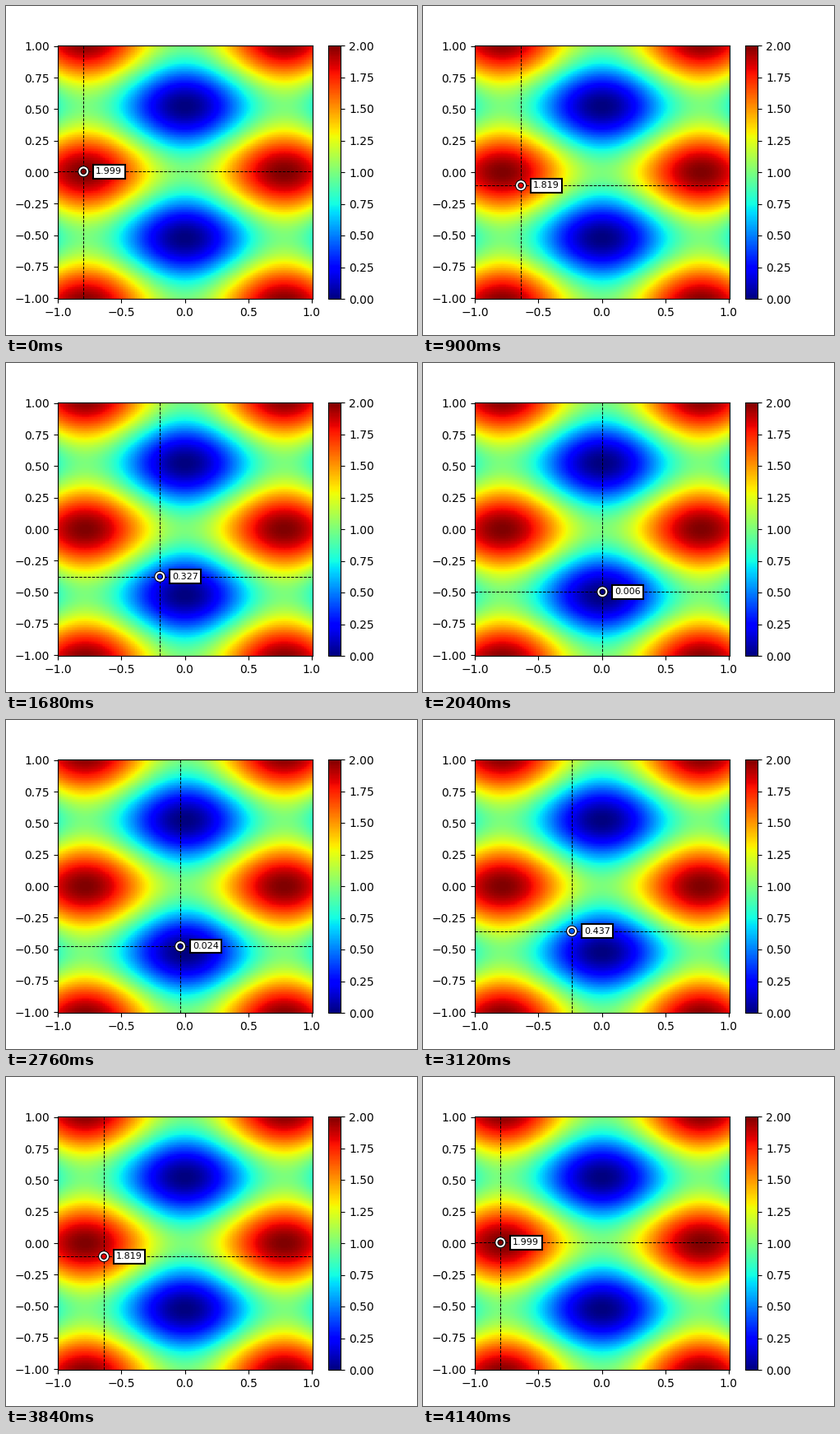
These frames come from a looping animation (500x400 px, 4.2 s). A matplotlib script:

```python
import numpy as np
import matplotlib.pyplot as plt
from matplotlib.animation import FuncAnimation
from matplotlib.patheffects import withStroke

FRAMES, INTERVAL = 70, 60
STEPS = 24               # cursor moves in each direction
GO, BACK = 10, 45        # last resting frame before each sweep
START, END = np.array([-0.8, 0.0]), np.array([0.0, -0.5])

grid = np.linspace(-1, 1, 200)
edge = 1 + (grid[1] - grid[0]) / 2
X, Y = np.meshgrid(grid, grid)
Z = np.sin(2 * X) ** 2 + np.cos(3 * Y) ** 2

fig, ax = plt.subplots(figsize=(5, 4), dpi=100)
mesh = ax.pcolormesh(X, Y, Z, cmap="jet", vmin=0, vmax=2, shading="nearest")
fig.colorbar(mesh)
ax.set(xlim=(-edge, edge), ylim=(-edge, edge))

hair = dict(color="black", lw=0.7, ls="--")
vline = ax.axvline(0, **hair)
hline = ax.axhline(0, **hair)

dot, = ax.plot([0], [0], "o", ms=4.5, mew=0, zorder=4)
ring, = ax.plot([0], [0], "o", ms=7, mfc="none", mec="white", mew=1.5, zorder=5,
                path_effects=[withStroke(linewidth=3, foreground="black")])
label = ax.annotate("", xy=(0, 0), xytext=(15, 0), textcoords="offset pixels",
                    fontsize=8, ha="left", va="center", zorder=6,
                    bbox=dict(boxstyle="square,pad=0.3", fc="white",
                              ec="black", lw=1.5))


def nearest(v):
    """Index of the grid sample closest to v."""
    return int(np.rint((v + 1) / 2 * (len(grid) - 1)))


def update(i):
    step = np.clip(i - GO, 0, STEPS) - np.clip(i - BACK, 0, STEPS)
    col, row = map(nearest, START + (END - START) * step / STEPS)
    x, y, z = grid[col], grid[row], Z[row, col]
    vline.set_xdata([x, x])
    hline.set_ydata([y, y])
    for marker in (dot, ring):
        marker.set_data([x], [y])
    dot.set_color(mesh.to_rgba(z))
    label.xy = (x, y)
    label.set_text(f"{z:.3f}")
    return vline, hline, dot, ring, label


anim = FuncAnimation(fig, update, frames=FRAMES, interval=INTERVAL,
                     repeat=True, repeat_delay=0, blit=False)
plt.show()
```
